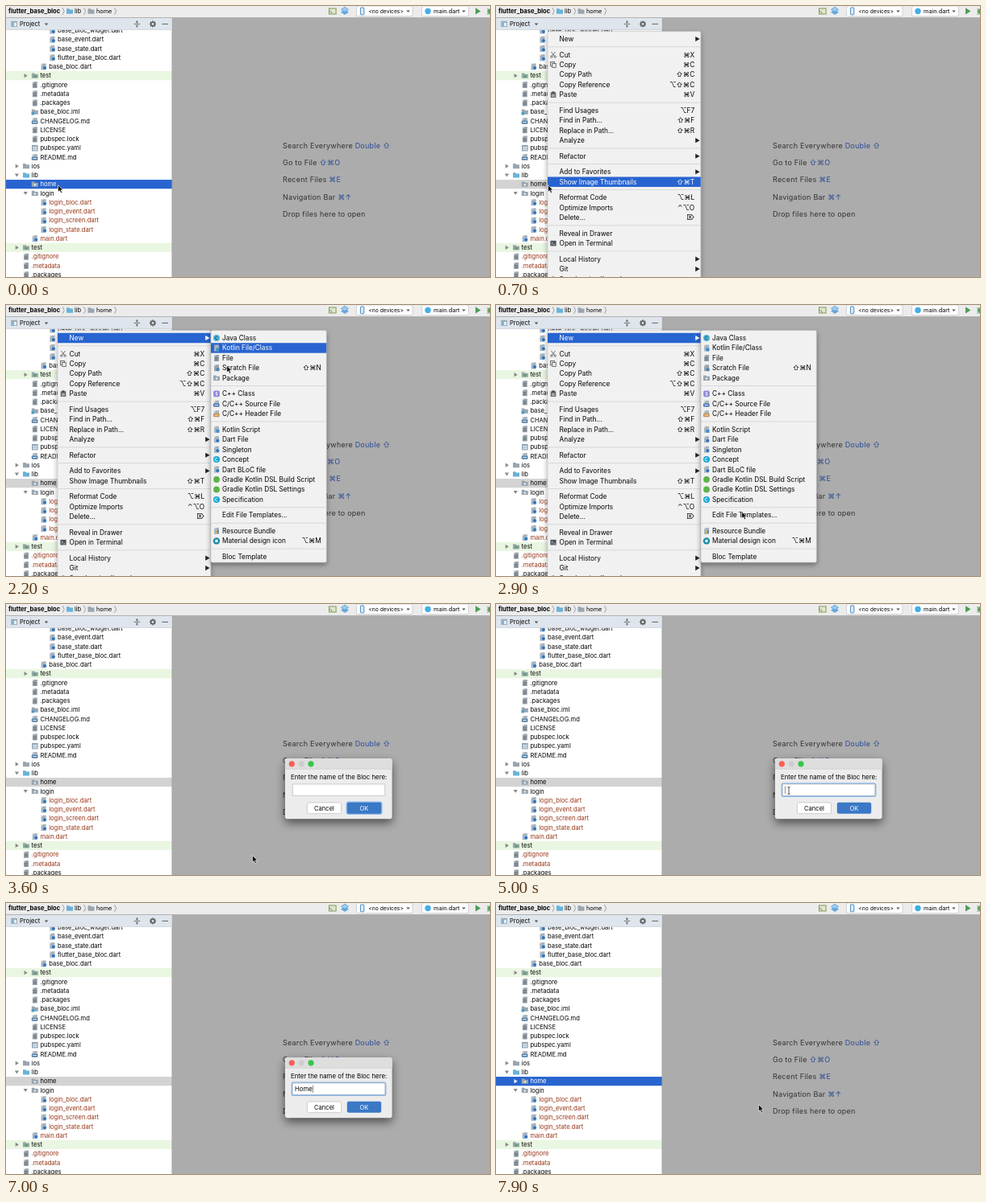
Write an HTML page that moves like this. It is 600 by 337 pixels and loops after 8000 ms.

```html
<!DOCTYPE html>
<html lang="en">
<head>
<meta charset="utf-8">
<title>Bloc template</title>
<style>
html, body { margin: 0; width: 100%; height: 100%; overflow: hidden; background: #acacac; }
svg { display: block; width: 100vw; height: 100vh; }
text { font-family: Inter, "DejaVu Sans", sans-serif; white-space: pre; }
.bar { fill: none; }
.on > .bar { fill: #2864d0; }
.on > text { fill: #fff; }
.on > .more { fill: #fff; }
</style>
</head>
<body>
<svg id="stage" viewBox="0 0 600 337" preserveAspectRatio="none"></svg>
<script>
const INK = '#050505', RED = '#973718', BLUE = '#2864d0', LINK = '#2a4c94';

const rect = (x, y, w, h, fill, more = '') =>
  `<rect x="${x}" y="${y}" width="${w}" height="${h}" fill="${fill}" ${more}/>`;
const dot = (x, y, r, fill, more = '') => `<circle cx="${x}" cy="${y}" r="${r}" fill="${fill}" ${more}/>`;
const shape = (d, fill, more = '') => `<path d="${d}" fill="${fill}" ${more}/>`;
const line = (d, color, w = 0.8) => shape(d, 'none', `stroke="${color}" stroke-width="${w}"`);
const text = (x, y, s, size = 7.6, fill = INK, more = '') =>
  `<text x="${x}" y="${y + size * 0.36}" font-size="${size}" fill="${fill}" ${more}>${s}</text>`;
const at = (x, y, s) => `<g transform="translate(${x} ${y})">${s}</g>`;
const group = (id, s) => `<g id="${id}">${s}</g>`;

// Icons are centred on 0,0 and about 8 px wide.
const page = (fill = '#9aa4ad') =>
  shape('M-3 -1.6L-.8 -4H3V4H-3Z', fill) + shape('M-3.2 -2.1V-4H-1.3Z', '#c5cbd0');
const lines = line('M-1.8 -.6H1.8M-1.8 .9H1.8M-1.8 2.4H1.8', '#5b646c', 0.7);
const folder = fill => shape('M-4 -3.2H-.8L.3 -2H4V3.2H-4Z', fill);
const tagged = tag => page('#a9b4bd') + rect(-4, -0.2, 7.6, 3.8, tag) + line('M-2.6 1.7H2.2', '#fff', 0.9);
const ring = line('M1.4 -1.2A1.9 1.9 0 1 0 1.4 1.2', '#fff', 0.9);
const icons = {
  file: page() + lines,
  dart: page('#a4b0ba') + dot(1.3, 1.5, 2.4, '#2f74bd', 'stroke="#fff" stroke-width=".4"'),
  yaml: rect(-3.8, -3.8, 7.6, 7.6, '#8ea4b6') + line('M-3 -.8H3M-3 1.6H3M-1 -2V3M1.4 -2V3', '#fff', 0.7),
  md: tagged('#4f7fa8'),
  iml: folder('#97a5b1') + rect(-4.2, 0.6, 3.4, 3.2, '#3e9fd0'),
  folder: folder('#98a5b0'),
  lib: folder('#68b3d8'),
  dir: folder('#98a5b0') + dot(0, 0.7, 1.2, '#eef2f5'),
  test: folder('#98a5b0') + rect(-1.5, -0.6, 3.2, 2.8, '#58a35c'),
  cls: dot(0, 0, 4, '#4eb2d8') + line('M1.4 -1.2A1.9 1.9 0 1 0 1.4 1.2', '#20566d', 0.9),
  kt: page('#a9b4bd') + rect(-0.5, 0, 4, 4, '#3c8fd2'),
  scratch: page() + dot(1.6, 1.8, 2.2, '#4b88b5'),
  cpp: rect(-3.8, -3.8, 7.6, 7.6, '#8b87d8', 'rx="1.6"') + line('M1.3 -1.8H-.8V0H1V1.8H-1.3', '#fff', 0.8),
  source: tagged('#4270b5'),
  head: tagged('#c98a3c'),
  teal: dot(0, 0, 4, '#12a6d0') + ring,
  green: dot(0, 0, 3.9, '#58b548'),
  props: page('#a9b4bd') + rect(-0.8, 0, 1.4, 3, '#e0a53a') + rect(1.2, -1.2, 1.4, 4.2, '#4478b0'),
  material: dot(0, 0, 4.2, '#1e8aa0') + rect(-1.7, -1.7, 3.4, 3.4, '#d9edf7'),
  cut: line('M-2.6 -3.6L1.6 2M2.6 -3.6L-1.6 2', '#555', 0.8) +
    dot(-2.2, 2.6, 1.2, 'none', 'stroke="#555" stroke-width=".8"') + dot(2.2, 2.6, 1.2, 'none', 'stroke="#555" stroke-width=".8"'),
  copy: rect(-3.4, -3.5, 4.8, 5.4, '#ddd', 'stroke="#555" stroke-width=".8"') +
    rect(-1.2, -1.4, 4.4, 5, '#eee', 'stroke="#555" stroke-width=".8"'),
  paste: rect(-3.3, -3, 6.6, 6.6, '#666') + rect(-1.5, -4, 3, 2, '#444') + rect(-1.8, -0.6, 3.6, 3.3, '#aaa'),
  term: rect(-3.6, -3.3, 7.2, 6.6, '#4c5359') + line('M-2.2 -1.5L-.6 0L-2.2 1.5M.3 1.7H2.2', '#fff', 0.7),
  sync: line('M-3 1A3 3 0 1 1 2.5 1.8M-2 2.4A3 3 0 0 0 1 2.8', '#555', 0.9)
};
const icon = (name, x, y) => name ? at(x, y, icons[name]) : '';

const twisty = (x, y, open) => at(x, y, shape(open ? 'M-2.6 -1.8H2.6L0 2.2Z' : 'M-1.7 -2.7L2.5 0L-1.7 2.7Z', '#8a8a8a'));
const drop = (x, y) => at(x, y, shape('M-2.2 -1.2H2.2L0 1.5Z', '#555'));

// Tree rows: level, icon, label, colour, twisty (1 closed, 2 open)
const tree = [
  [3, 'dart', 'base_bloc_widget.dart'], [3, 'dart', 'base_event.dart'],
  [3, 'dart', 'base_state.dart'], [3, 'dart', 'flutter_base_bloc.dart'],
  [2, 'dart', 'base_bloc.dart'], [1, 'test', 'test', INK, 1],
  [1, 'file', '.gitignore'], [1, 'file', '.metadata'], [1, 'file', '.packages'],
  [1, 'iml', 'base_bloc.iml'], [1, 'md', 'CHANGELOG.md'], [1, 'file', 'LICENSE'],
  [1, 'file', 'pubspec.lock'], [1, 'yaml', 'pubspec.yaml'], [1, 'md', 'README.md'],
  [0, 'folder', 'ios', INK, 1], [0, 'lib', 'lib', INK, 2],
  [1, 'dir', 'home'], [1, 'dir', 'login', INK, 2],
  [2, 'dart', 'login_bloc.dart', RED], [2, 'dart', 'login_event.dart', RED],
  [2, 'dart', 'login_screen.dart', RED], [2, 'dart', 'login_state.dart', RED],
  [1, 'dart', 'main.dart', RED], [0, 'test', 'test', INK, 1],
  [0, 'file', '.gitignore', RED], [0, 'file', '.metadata', RED], [0, 'file', '.packages']
];

function treeRow([level, kind, label, fill = INK, mark], i) {
  const x = 31.6 + level * 10.8, y = 30.4 + i * 11.25;
  const home = label === 'home';
  const back = home ? rect(0, y - 5.6, 206, 11.2, '#d3d3d3', 'id="homeBar"')
    : label === 'test' ? rect(0, y - 5.6, 206, 11.2, '#e9f6e1') : '';
  const arrow = home ? group('homeArrow', at(x - 18.2, y, shape('M-1.7 -2.7L2.5 0L-1.7 2.7Z', '#fff')))
    : mark ? twisty(x - 18.2, y, mark === 2) : '';
  return back + arrow + icon(kind, x - 6.6, y) +
    text(x, y, label, 7.6, fill, home ? 'id="homeText"' : '');
}

const chevron = x => line(`M${x} 2.2L${x + 2.2} 6.5L${x} 10.8`, '#8a8a8a', 0.8);
const combo = (x, w) => rect(x, 0, w, 12.8, '#fdfdfd', 'rx="2.2" stroke="#c2c2c2" stroke-width=".7"');

const toolbar = rect(0, 0, 600, 14, '#ececec') + rect(0, 14, 600, 1, '#b2b2b2') +
  text(3, 6.5, 'flutter_base_bloc', 7.55, INK, 'font-weight="700"') + chevron(70) +
  icon('lib', 79, 6.5) + text(85, 6.5, 'lib', 7.4) + chevron(96.5) +
  icon('folder', 105.5, 6.5) + text(112, 6.5, 'home', 7.3) + chevron(134.5) +
  rect(400.5, 3, 8.6, 7, '#dfe6cf', 'stroke="#819b55" stroke-width="1"') +
  line('M400.6 6.3A3.6 3.6 0 0 1 404.2 9.8', '#819b55', 1) +
  shape('M420 4.4L425 7.7L420 11L415 7.7Z', '#69a9dc') +
  shape('M420 1.2L424.6 4.4L420 7.6L415.4 4.4Z', '#9ccbed', 'stroke="#4d94cf" stroke-width=".7"') +
  combo(434.5, 69.5) + rect(439.4, 2, 4.4, 8.8, '#dcebf7', 'rx=".8" stroke="#478bc5" stroke-width="1"') +
  text(449.3, 6.5, '&lt;no devices>', 6.75) + drop(498.5, 6.6) +
  combo(515.5, 58) + dot(523, 6.5, 3.7, '#45aee6') + text(530, 6.5, 'main.dart', 7.3) + drop(567.5, 6.6) +
  shape('M582 2.3L588.5 6.4L582 10.5Z', '#4b9d54') + dot(600, 6.7, 3, '#57a45c') + line('M596 4H600M596 7H600M596 10H600', '#57a45c', 0.8);

const teeth = Array.from({ length: 8 }, (_, i) =>
  `<rect x="-.8" y="-4" width="1.6" height="2" fill="#616161" transform="rotate(${i * 45})"/>`).join('');
const header = rect(0, 15, 205.5, 14.6, '#dfe5ec') + rect(0, 29.2, 205.5, 0.6, '#c6cbd1') +
  rect(6.3, 18.8, 7.6, 7.2, '#9aa7b2') + rect(7.2, 20.8, 5.8, 4.3, '#e9eef2') + rect(7.2, 20.8, 2.6, 4.3, '#6fb0d8') +
  text(17, 22.4, 'Project', 7.6) + drop(50, 22.8) +
  line('M158.6 22.4H166.2M162.4 18V20.8M162.4 24V26.8', '#616161', 0.9) +
  shape('M160.6 19.6H164.2L162.4 21.4ZM160.6 25.2H164.2L162.4 23.4Z', '#616161') +
  at(182, 22.4, teeth + dot(0, 0, 2.2, 'none', 'stroke="#616161" stroke-width="1.5"')) +
  line('M193.5 22.4H201', '#616161', 1);

const hints = [['Search Everywhere', 'Double ⇧'], ['Go to File', '⇧⌘O'], ['Recent Files', '⌘E'],
  ['Navigation Bar', '⌘↑'], ['Drop files here to open', '']]
  .map(([label, key], i) => text(343, 173.6 + i * 21.3,
    `${label} <tspan fill="${LINK}">${key}</tspan>`, 9, '#333', 'letter-spacing=".23"')).join('');

// Menu rows: label, shortcut ('>' opens a submenu), icon; null is a divider
const mainItems = [
  ['New', '>'], null,
  ['Cut', '⌘X', 'cut'], ['Copy', '⌘C', 'copy'], ['Copy Path', '⇧⌘C'],
  ['Copy Reference', '⌥⇧⌘C'], ['Paste', '⌘V', 'paste'], null,
  ['Find Usages', '⌥F7'], ['Find in Path...', '⇧⌘F'], ['Replace in Path...', '⇧⌘R'], ['Analyze', '>'], null,
  ['Refactor', '>'], null,
  ['Add to Favorites', '>'], ['Show Image Thumbnails', '⇧⌘T'], null,
  ['Reformat Code', '⌥⌘L'], ['Optimize Imports', '⌃⌥O'], ['Delete...', '⌦'], null,
  ['Reveal in Drawer', ''], ['Open in Terminal', '', 'term'], null,
  ['Local History', '>'], ['Git', '>'], ["Synchronize 'home'", '', 'sync']
];
const subItems = [
  ['Java Class', '', 'cls'], ['Kotlin File/Class', '', 'kt'], ['File', '', 'file'],
  ['Scratch File', '⇧⌘N', 'scratch'], ['Package', '', 'dir'], null,
  ['C++ Class', '', 'cpp'], ['C/C++ Source File', '', 'source'], ['C/C++ Header File', '', 'head'], null,
  ['Kotlin Script', '', 'kt'], ['Dart File', '', 'dart'], ['Singleton', '', 'dart'], ['Concept', '', 'teal'],
  ['Dart BLoC file', '', 'dart'], ['Gradle Kotlin DSL Build Script', '', 'green'],
  ['Gradle Kotlin DSL Settings', '', 'green'], ['Specification', '', 'teal'], null,
  ['Edit File Templates...', ''], null,
  ['Resource Bundle', '', 'props'], ['Material design icon', '⌥⌘M', 'material'], null,
  ['Bloc Template', '']
];
const STEP = 12.45, GAP = 7.08, FONT = 8.27;

function menu(id, items, x, w, h, indent, keyRight) {
  const rows = [];
  let y = 41, out = rect(x, 31.6, w, h, '#f1f1f1', 'rx="2" stroke="#b4b4b4" stroke-width=".5" filter="url(#soft)"');
  for (const item of items) {
    if (!item) {
      out += rect(x, y - STEP / 2 + GAP / 2 - 0.5, w, 1, '#d8d8d8');
      y += GAP;
      continue;
    }
    const [label, key, kind] = item;
    const tail = key === '>' ? shape(`M${x + w - 6.6} ${y - 3.1}l5.4 3.1l-5.4 3.1Z`, '#222', 'class="more"')
      : text(keyRight, y, key, FONT, INK, 'text-anchor="end"');
    out += `<g id="${id}${rows.length}"><rect class="bar" x="${x}" y="${y - STEP / 2}" width="${w}" height="${STEP}"/>` +
      icon(kind, x + 7, y) + text(x + indent, y, label, FONT) + tail + '</g>';
    rows.push(y);
    y += STEP;
  }
  return { svg: group(id, out), rows, id };
}
const mainMenu = menu('main', mainItems, 64, 189.8, 320, 14.6, 246.2);
const subMenu = menu('sub', subItems, 254, 143.3, 288.5, 14, 390.7);

const dialog = rect(346, 192, 132.6, 75.3, '#000', 'rx="3" opacity=".55" filter="url(#deep)"') +
  rect(346, 192, 132.6, 75.3, '#ececec', 'rx="3"') +
  shape('M346 205V195Q346 192 349 192H475.6Q478.6 192 478.6 195V205Z', '#dedede') + rect(346, 204.8, 132.6, 0.6, '#c4c4c4') +
  dot(354.3, 198.8, 3.6, '#f95f57') + dot(366.2, 198.8, 3.6, '#cdcdcd') + dot(378, 198.8, 3.6, '#35c748') +
  text(353, 215, 'Enter the name of the Bloc here:', 7.85) +
  group('ring', rect(354.6, 223.4, 115.8, 15.6, 'none', 'rx="1.5" stroke="#85b4ea" stroke-width="2"')) +
  rect(355.2, 224, 114.6, 14.2, '#fff', 'stroke="#b9b9b9" stroke-width=".7"') +
  text(358, 231.4, '<tspan id="typed"></tspan><tspan id="caret" font-weight="300" dx="-.4">|</tspan>', 7.8) +
  rect(373.4, 247, 42.2, 13.7, '#fff', 'rx="2" stroke="#bcbcbc" stroke-width=".7"') +
  text(394.5, 253.9, 'Cancel', 7.6, INK, 'text-anchor="middle"') +
  group('okRing', rect(421.6, 245.6, 45, 16.5, '#96bdec', 'rx="3"')) +
  rect(422.8, 246.8, 42.4, 14, '#3b78c6', 'rx="2"') +
  text(444, 253.9, 'OK', 7.6, '#fff', 'text-anchor="middle"');

const pointer = shape('M-.5 -.3V8.2L1.6 6.4L3 9.6L4.6 8.9L3.2 5.8H5.8Z', '#111', 'stroke="#fff" stroke-width=".6"');
const beam = line('M-1.5 -4.5Q0 -4.5 0 -3.5V3.5Q0 4.5 -1.5 4.5M1.5 -4.5Q0 -4.5 0 -3.5M0 3.5Q0 4.5 1.5 4.5', '#222', 0.8);

const stage = document.getElementById('stage');
stage.innerHTML = `<defs>
  <filter id="soft" x="-20%" y="-20%" width="140%" height="140%"><feDropShadow dx="0" dy="3" stdDeviation="3" flood-opacity=".38"/></filter>
  <filter id="deep" x="-30%" y="-40%" width="160%" height="200%"><feOffset dy="5"/><feGaussianBlur stdDeviation="6"/></filter>
  <clipPath id="pane">${rect(0, 29.6, 206, 310, '#fff')}</clipPath></defs>` +
  rect(0, 0, 600, 337, '#acacac') + rect(0, 14, 206, 323, '#fff') +
  `<g clip-path="url(#pane)">${tree.map(treeRow).join('')}</g>` +
  rect(205.5, 14, 0.8, 323, '#9f9f9f') + toolbar + header + hints +
  mainMenu.svg + subMenu.svg + group('dialog', dialog) + group('pointer', pointer) + group('beam', beam);

const $ = id => document.getElementById(id);
const show = (id, on) => { $(id).style.display = on ? '' : 'none'; };

// Pointer path: time, x, y
const path = [
  [0, 65, 223], [900, 65, 223], [1300, 150, 110], [1500, 193, 42], [1600, 198, 37], [1750, 206, 40],
  [2050, 262, 42], [2400, 290, 120], [2800, 304, 251], [2900, 305, 257], [3200, 306, 313],
  [3700, 306, 313], [4400, 363, 232], [7300, 363, 232], [7750, 326, 251], [8000, 326, 251]
];
const keys = [[5700, 'H'], [6000, 'Ho'], [6400, 'Hom'], [6700, 'Home']];
const OPEN = 300, SUB = 1800, PICK = 3400, FOCUS = 4700, ENTER = 7100, LOOP = 8000;

function pointAt(t) {
  const i = Math.max(1, path.findIndex(p => p[0] >= t));
  const [a, b] = [path[i - 1], path[i]];
  const k = Math.max(0, (t - a[0]) / (b[0] - a[0]));
  return [a[1] + (b[1] - a[1]) * k, a[2] + (b[2] - a[2]) * k];
}

function mark(m, y) {
  m.rows.forEach((row, i) => $(m.id + i).classList.toggle('on', Math.abs(row - y) < STEP / 2));
}

function draw(t) {
  const selected = t < OPEN || t >= ENTER;
  $('homeBar').setAttribute('fill', selected ? BLUE : '#d3d3d3');
  $('homeText').setAttribute('fill', selected ? '#fff' : INK);
  show('homeArrow', t >= ENTER);

  // Highlights trail the pointer slightly.
  const [hx, hy] = pointAt(t - 100);
  const subOpen = t >= SUB && t < PICK;
  show('main', t >= OPEN && t < PICK);
  show('sub', subOpen);
  mark(mainMenu, subOpen ? 41 : t < OPEN + 150 ? -99 : hy);
  mark(subMenu, hx > 254 ? hy : -99);

  const focused = t >= FOCUS;
  const key = keys.filter(k => k[0] <= t).pop() || [FOCUS, ''];
  show('dialog', t >= PICK && t < ENTER);
  show('ring', focused);
  show('okRing', !focused);
  $('typed').textContent = key[1];
  $('caret').style.opacity = focused && Math.floor((t - key[0]) / 500) % 2 === 0 ? 1 : 0;

  const [x, y] = pointAt(t);
  const overField = t >= PICK && t < ENTER && x > 355 && y < 238;
  const hidden = t >= keys[0][0] && t < 7300;
  show('pointer', !hidden && !overField);
  show('beam', !hidden && overField);
  for (const id of ['pointer', 'beam']) $(id).setAttribute('transform', `translate(${x} ${y})`);
}

const start = performance.now();
function tick() {
  draw((performance.now() - start) % LOOP);
  requestAnimationFrame(tick);
}
tick();
</script>
</body>
</html>
```
